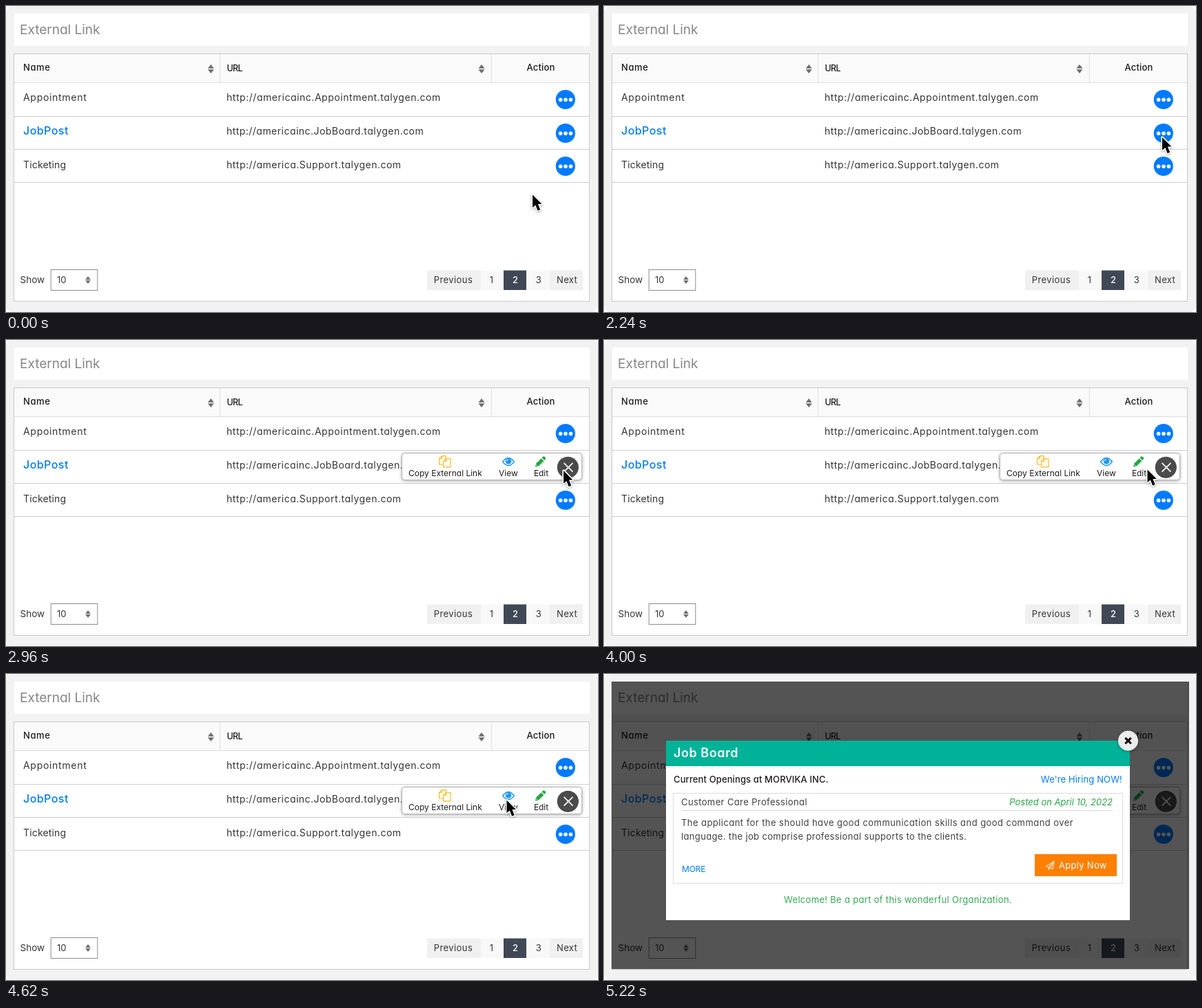
An HTML page for the animation above (7320 ms loop, 859 by 445 pixels).

```html
<!DOCTYPE html>
<html lang="en">
<head>
<meta charset="utf-8">
<title>External Link</title>
<style>
  html, body { margin: 0; width: 100%; height: 100%; overflow: hidden; background: #fff; }
  svg { display: block; width: 859px; height: 445px; }
  text { font-family: Inter, "Open Sans", sans-serif; font-feature-settings: "cv11"; white-space: pre; }
  .cursor { filter: drop-shadow(0 1px 1.5px rgba(0, 0, 0, .35)); }
  .raised { filter: drop-shadow(0 1px 2px rgba(0, 0, 0, .35)); }
</style>
</head>
<body>
<svg id="stage" viewBox="0 0 859 445" xmlns="http://www.w3.org/2000/svg"></svg>
<script>
const LOOP = 7320;
const INK = '#353535', DARK = '#1c1c1c', SOFT = '#404040', BLUE = '#007bff';

const rect = (x, y, w, h, fill, extra = '') =>
  `<rect x="${x}" y="${y}" width="${w}" height="${h}" fill="${fill}" ${extra}/>`;
const line = (x1, y1, x2, y2, stroke, width = 1) =>
  `<path d="M${x1} ${y1}L${x2} ${y2}" stroke="${stroke}" stroke-width="${width}" fill="none"/>`;
const circle = (x, y, r, fill) => `<circle cx="${x}" cy="${y}" r="${r}" fill="${fill}"/>`;
const path = (d, fill, extra = '') => `<path d="${d}" fill="${fill}" ${extra}/>`;
const group = (attrs, ...parts) => `<g ${attrs}>${parts.join('')}</g>`;
const cross = (x, y, r, stroke, width) =>
  line(x - r, y - r, x + r, y + r, stroke, width) + line(x + r, y - r, x - r, y + r, stroke, width);

function text(str, x, y, size, { fill = INK, weight = 400, gap = 0, anchor = 'start', extra = '' } = {}) {
  return `<text x="${x}" y="${y}" font-size="${size}" fill="${fill}" font-weight="${weight}" ` +
    `letter-spacing="${gap}" text-anchor="${anchor}" ${extra}>${str}</text>`;
}

// Pair of small triangles used by table headers and the select box
const sorter = (x, y, s = 1) =>
  path('M-4.5 -.7L0 -6.5L4.5 -.7ZM-4.5 .7L0 6.5L4.5 .7Z', '#6e6e6e',
    `transform="translate(${x} ${y}) scale(${s})"`);

const dots = y => circle(811.8, y, 14.1, BLUE) +
  [804.6, 812, 819.4].map(x => circle(x, y + .2, 2.8, '#fff')).join('');

function row(name, url, y, nameStyle, urlGap) {
  return text(name, 25, y, nameStyle.size || 14, nameStyle) +
    text(url, 320, y, 14, { gap: urlGap });
}

function pager() {
  const cells = [
    ['Previous', 611, 78, 649, '#f0f0f0', .4], ['1', 689, 32, 704.3, '#f8f8f8', 0],
    ['2', 722, 33, 739, '#3f4854', 0], ['3', 755, 34, 772.8, '#f8f8f8', 0],
    ['Next', 789, 48, 814, '#f0f0f0', .3]
  ];
  return cells.map(([label, x, w, center, bg, gap]) => {
    const active = label === '2';
    return rect(x, 384.5, w, 28.5, bg) +
      text(label, center, 403, 13, {
        gap, anchor: 'middle', fill: active ? '#fff' : INK, weight: active ? 500 : 400
      });
  }).join('');
}

function page() {
  const head = { weight: 500, fill: DARK };
  return [
    rect(0, 0, 859, 445, '#f2f2f2', 'rx="9"'),
    rect(12, 11, 835, 47, '#fff'),
    text('External Link', 20, 41, 19, { fill: '#868686' }),
    rect(11.5, 69.5, 835, 360, '#fff', 'stroke="#c8c8c8"'),
    rect(12, 70, 834, 41, '#fafafa'),
    line(310.5, 70, 310.5, 111, '#dedede'),
    line(704.5, 70, 704.5, 111, '#dedede'),
    line(12, 111.5, 846, 111.5, '#dcdcdc'),
    ...[160.5, 208.5, 256.5].map(y => line(12, y, 846, y, '#cdcdcd')),
    text('Name', 25, 94, 13, { ...head, gap: .6 }),
    text('URL', 320.4, 95, 12.5, { ...head, gap: -.6 }),
    text('Action', 755.6, 94, 13, { ...head, gap: .15 }),
    sorter(297.3, 91.5), sorter(690, 91.5),
    row('Appointment', 'http://americainc.Appointment.talygen.com', 138, { gap: .7 }, .54),
    row('JobPost', 'http://americainc.JobBoard.talygen.com', 187,
      { size: 16, gap: .45, weight: 500, fill: BLUE }, .46),
    row('Ticketing', 'http://america.Support.talygen.com', 236, { gap: .15 }, .48),
    ...[136, 185, 233].map(dots),
    text('Show', 20.6, 403, 13.5),
    rect(65.2, 383.5, 67.6, 30, '#fff', 'stroke="#8c8c8c"'),
    text('10', 74, 403, 13),
    sorter(119, 398.5, .85),
    pager()
  ].join('');
}

function actions() {
  const copy = group('fill="#fff" stroke="#fdbb1f" stroke-width="1.2" stroke-linejoin="round"',
    '<path d="M632.5 168.6H638.4V181H628.6V172.5ZM632.5 168.6V172.5H628.6"/>',
    '<path d="M638.5 172.6H645V184.8H634.6V176.5ZM638.5 172.6V176.5H634.6"/>');
  const eye =
    path('M720.6 177Q729 166 737.4 177Q729 188 720.6 177Z', '#fff', 'stroke="#2196f3" stroke-width="1.4"') +
    circle(729, 176.3, 4.3, '#2196f3') +
    path('M726.5 176.2A2.6 2.6 0 0 1 729 173.7', 'none', 'stroke="#fff"');
  const pencil =
    path('M768 184.5L769 179.8L776.6 172.2L780.4 176L772.7 183.6ZM777.5 171.3L779.4 169.4Q780.3 168.6 781.2 169.4' +
      'L783 171.2Q783.8 172.1 783 173L781.2 175Z', '#28a745') +
    path('M769.4 181.4L771.2 183.2', 'none', 'stroke="#fff"');
  return [
    rect(574.5, 164.5, 261, 39, '#fff', 'rx="4" stroke="#b4b4b4" class="raised"'),
    copy, eye, pencil,
    text('Copy External Link', 584, 198, 12, { fill: DARK }),
    text('View', 715, 198, 12, { fill: DARK }),
    text('Edit', 766, 198, 12, { fill: DARK, gap: -.1 }),
    circle(815.3, 185.3, 15.6, '#4b4b4b'),
    cross(816, 185.2, 6.4, '#fff', 1.7)
  ].join('');
}

function modal() {
  const plane = path('M641.5 279.5L653 272.6L651.2 283.6L647.3 282L645.2 284.7V281.1ZM645.2 281.1L653 272.6L647.3 282',
    'none', 'stroke="#fff" stroke-linejoin="round"');
  return [
    rect(90, 97, 673, 261, '#fff'),
    rect(90, 97, 673, 37, '#00b398'),
    text('Job Board', 101, 121, 18, { fill: '#fff', weight: 600, gap: .55 }),
    group('class="raised"', circle(760.5, 97, 14.5, '#ececec')),
    cross(760.6, 97.1, 4.2, '#000', 3),
    text('Current Openings at MORVIKA INC.', 101, 158, 13, { weight: 500, gap: .12, fill: DARK }),
    text("We're Hiring NOW!", 752, 158, 13, { fill: BLUE, gap: .13, anchor: 'end' }),
    rect(100.5, 173.5, 652, 131, '#fff', 'stroke="#dcdcdc"'),
    text('Customer Care Professional', 112, 191, 13, { gap: .38, fill: SOFT }),
    text('Posted on April 10, 2022', 738, 191, 13,
      { fill: '#28a745', anchor: 'end', extra: 'font-style="italic"' }),
    line(113, 198.5, 738, 198.5, '#d4d4d4'),
    text('The applicant for the should have good communication skills and good command over',
      112, 221, 13, { gap: .44, fill: SOFT }),
    text('language. the job comprise professional supports to the clients.',
      112, 241, 13, { gap: .35, fill: SOFT }),
    text('MORE', 113, 288, 12, { fill: BLUE, gap: -.2 }),
    rect(625, 262, 119, 32, '#ff8000'),
    plane,
    text('Apply Now', 660, 283, 13, { fill: '#fff', gap: .3 }),
    text('Welcome! Be a part of this wonderful Organization.', 426.5, 333, 13,
      { fill: '#32a852', gap: .31, anchor: 'middle' })
  ].join('');
}

const pointer = path('M0 0V18.8L4.3 14.9L7.6 23.2L11.2 21.7L7.9 13.6H13.4Z', '#000',
  'stroke="#fff" stroke-width="3.4" stroke-linejoin="round" paint-order="stroke"');

document.getElementById('stage').innerHTML =
  page() +
  group('id="actions"', actions()) +
  group('id="shade"', rect(11, 11, 838, 418, '#000', 'fill-opacity=".67"')) +
  group('id="modal"', modal()) +
  group('id="cursor" class="cursor"', pointer);

const part = Object.fromEntries(['actions', 'shade', 'modal', 'cursor']
  .map(id => [id, document.getElementById(id)]));

// Cursor legs: start time, step length, step count, goal
const START = [764, 274.5];
const LEGS = [
  [2040, 40, 6, [810, 191]],
  [2740, 100, 1, [809, 190]],
  [4000, 40, 4, [727, 184]],
  [4620, 100, 1, [726.5, 183.5]]
];

// Held linear progress: the first step lands at the start time
const stepped = (t, at, len, n) =>
  Math.min(n, Math.max(0, Math.floor((t - at) / len) + 1)) / n;

function cursorAt(t) {
  let pos = START;
  for (const [at, len, n, goal] of LEGS) {
    const p = stepped(t, at, len, n);
    pos = pos.map((v, i) => v + (goal[i] - v) * p);
  }
  return pos;
}

const show = (el, on) => { el.style.display = on ? '' : 'none'; };

function draw(t) {
  const [x, y] = cursorAt(t);
  part.cursor.setAttribute('transform', `translate(${x} ${y})`);
  part.actions.setAttribute('opacity', stepped(t, 2840, 30, 5));
  show(part.shade, t >= 4720);
  show(part.modal, t >= 5220);
  show(part.cursor, t < 5220);
}

const begin = performance.now();
function tick() {
  draw((performance.now() - begin) % LOOP);
  requestAnimationFrame(tick);
}
tick();
</script>
</body>
</html>
```
